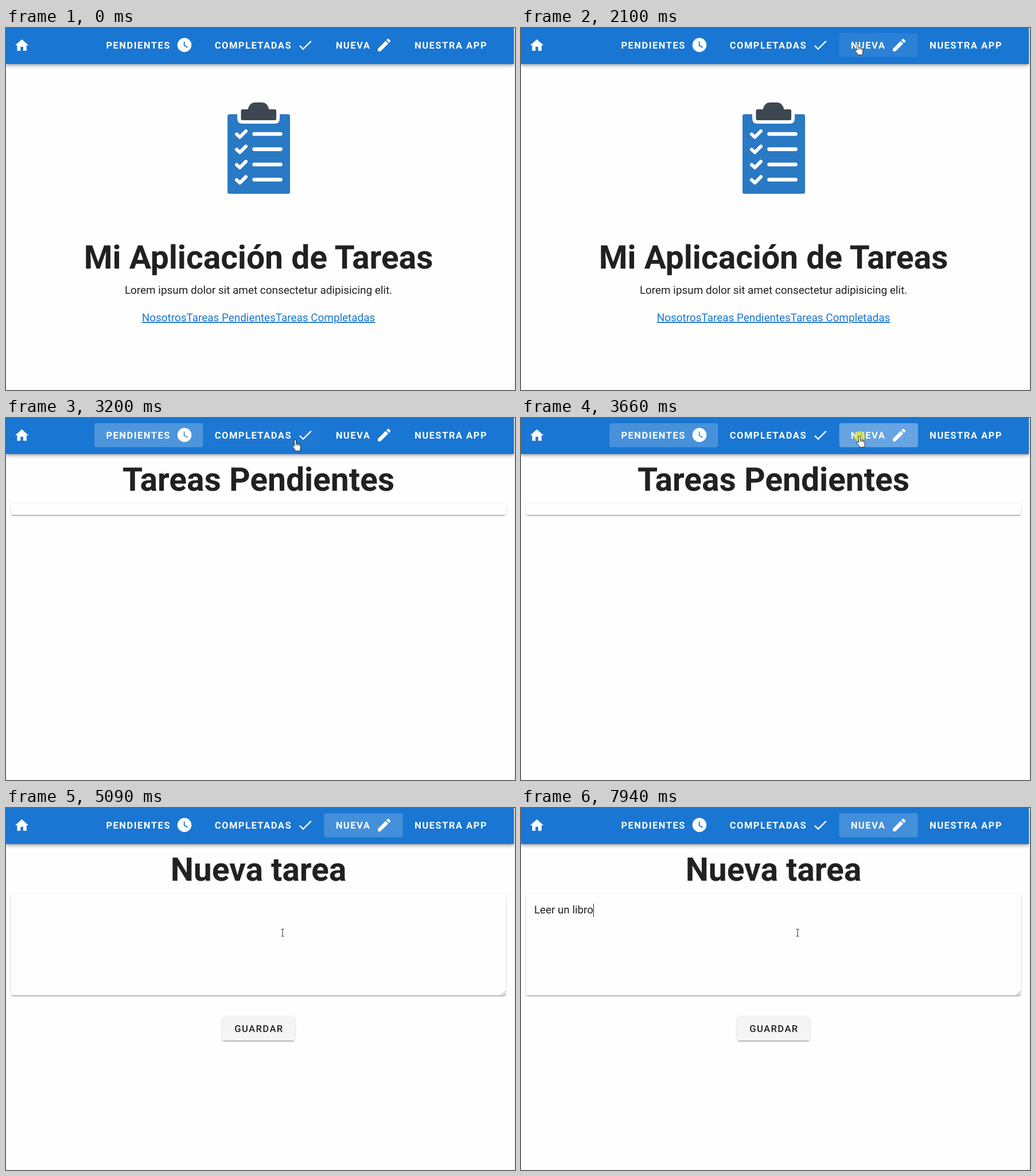
Write an HTML page that moves like this. It is 887x632 px and loops after 8 s.

```html
<!DOCTYPE html>
<html lang="es">
<head>
<meta charset="utf-8">
<title>Mi Aplicación de Tareas</title>
<style>
  html, body { margin: 0; width: 100%; height: 100%; overflow: hidden; background: #fefefe; }
  #stage { position: relative; width: 887px; height: 632px; overflow: hidden; font-family: Roboto, sans-serif; color: #212121; }
  #stage > * { position: absolute; }
  svg { left: 0; top: 0; text-rendering: geometricPrecision; }
  #bar { left: 0; top: 0; width: 885px; height: 63px; background: #1976d2;
    box-shadow: 0 2px 4px -1px rgba(0,0,0,.2), 0 4px 5px rgba(0,0,0,.14), 0 1px 10px rgba(0,0,0,.12); }
  #edge { left: 886px; top: 0; width: 1px; height: 632px; background: #e8e8e8; }
  .raised { border-radius: 4px;
    box-shadow: 0 3px 1px -2px rgba(0,0,0,.2), 0 2px 2px rgba(0,0,0,.14), 0 1px 5px rgba(0,0,0,.12); }
  #card { left: 9px; top: 150px; width: 862px; background: #fefefe; }
  #save { left: 377px; top: 364px; width: 126px; height: 42px; background: #f5f5f5; }
  #typed { left: 23px; top: 167px; height: 23px; line-height: 23px; font-size: 18.77px; white-space: pre;
    border-right: 1px solid transparent; text-rendering: geometricPrecision; }
  text { fill: #212121; }
  .nav { font-weight: 700; font-size: 16.5px; letter-spacing: 1.5px; fill: #fff; }
  .title { font-weight: 700; font-size: 56.9px; text-anchor: middle; }
  .mid { text-anchor: middle; }
  .link { fill: #1976d2; text-decoration: underline; }
  #hint { fill: #707070; }
</style>
</head>
<body>
<div id="stage">
  <div id="edge"></div>
  <div id="bar"></div>
  <div id="card" class="raised"></div>
  <div id="save" class="raised"></div>
  <div id="typed"></div>
  <svg width="887" height="632" viewBox="0 0 887 632">
    <defs>
      <clipPath id="pendingClip"><rect x="154" y="9" width="189" height="42" rx="4"/></clipPath>
      <clipPath id="createClip"><rect x="555" y="9" width="137" height="42" rx="4"/></clipPath>
      <g id="row" fill="none" stroke="#fff" stroke-linecap="round" stroke-linejoin="round">
        <path d="M402 .5 407.5 5.5 418-5" stroke-width="6"/>
        <path d="M432.5 0H478.5" stroke-width="6.6"/>
      </g>
    </defs>

    <g id="tints" fill="#fff"></g>
    <g clip-path="url(#pendingClip)"><circle id="pendingRipple" cx="254" cy="30" fill="#fff"/></g>
    <g clip-path="url(#createClip)"><circle id="createRipple" cx="605" cy="30" fill="#fff"/></g>

    <g fill="#fff">
      <path transform="translate(13.6 16.3) scale(1.17)" d="M10 20V14H14V20H19V12H22L12 3 2 12H5V20Z"/>
      <path transform="translate(296.2 14.9) scale(1.23)" fill-rule="evenodd" d="M12 2A10 10 0 0 0 12 22 10 10 0 0 0 12 2M16.2 16.2 11 13V7H12.5V12.2L17 14.9Z"/>
      <path transform="translate(506.7 15.1) scale(1.23)" d="M21 7 9 19 3.5 13.5 4.91 12.09 9 16.17 19.59 5.59Z"/>
      <path transform="translate(644.3 15) scale(1.23)" d="M20.71 7.04C21.1 6.65 21.1 6 20.71 5.63L18.37 3.29C18 2.9 17.35 2.9 16.96 3.29L15.12 5.12 18.87 8.87M3 17.25V21H6.75L17.81 9.93 14.06 6.18Z"/>
    </g>
    <g id="labels"></g>

    <g id="home">
      <rect x="386" y="150.5" width="109" height="139" rx="3.5" fill="#2a79c4"/>
      <path d="M403 148V158Q403 167 412 167H468Q477 167 477 158V148Z" fill="#fefefe"/>
      <rect x="409.5" y="142" width="61.5" height="19" rx="2.5" fill="#3c4751"/>
      <path d="M421.5 143C423 134 428 130 434 130H446C452 130 457 134 458.5 143Z" fill="#3c4751"/>
      <g id="rows"></g>
      <text class="title" x="440" y="420">Mi Aplicación de Tareas</text>
      <text class="mid" x="440" y="464" font-size="18.9">Lorem ipsum dolor sit amet consectetur adipisicing elit.</text>
      <text class="mid link" x="440" y="512" font-size="18.9">NosotrosTareas PendientesTareas Completadas</text>
    </g>
    <text id="pending" class="title" x="440" y="127">Tareas Pendientes</text>
    <g id="create">
      <text class="title" x="440" y="127">Nueva tarea</text>
      <text id="hint" x="22.7" y="190" font-size="18.85">Descripcion de la tarea</text>
      <text class="mid" x="441" y="391" font-size="16.5" font-weight="500" letter-spacing="1.47">GUARDAR</text>
      <path d="M863.5 327 870.5 320M867.5 327 870.5 324" stroke="#777"/>
    </g>

    <circle id="press" r="9.3" fill="#dce035" fill-opacity=".75"/>
    <g id="cursor">
      <path id="arrow" d="M0 0V13L3 10.2 5 15 7 14.2 5 9.6H9Z" fill="#fff" stroke="#1e5a9e"/>
      <g id="hand" stroke="#222" stroke-width=".9">
        <path d="M-1.5 1Q-1.5-.5 0-.5T1.5 1V6L7 7.5Q9 8 9 10V14Q9 17 7.5 19H.5Q-1 16-4 12.5-5.5 10.5-4 9.8-3 9.5-1.5 11Z" fill="#fff"/>
        <path d="M1.5 6V10M4.2 7V10M6.7 7.5V10.5" fill="none"/>
      </g>
      <path id="beam" d="M-2.5-6H-.5L0-5.5.5-6H2.5M0-5.5V6M-2.5 6.5H-.5L0 6 .5 6.5H2.5" fill="none" stroke="#222"/>
    </g>
  </svg>
</div>
<script>
const LOOP = 8000;
const PHRASE = 'Leer un libro';
const TYPE_AT = 5630, KEY_GAP = 192.5, BLINK_AT = 5090;
const PENDING_CLICK = 2650, CREATE_CLICK = 3540, FIELD_CLICK = 4480;
const PENDING_AT = PENDING_CLICK + 135, CREATE_AT = CREATE_CLICK + 135, FOCUS_AT = FIELD_CLICK + 70;

const $ = id => document.getElementById(id);
const show = (id, on) => { $(id).style.display = on ? '' : 'none'; };
const ramp = (t, from, length) => Math.min(1, Math.max(0, (t - from) / length));
const smooth = k => k * k * (3 - 2 * k);

function add(parent, tag, attributes, text = '') {
  const node = document.createElementNS('http://www.w3.org/2000/svg', tag);
  for (const key in attributes) node.setAttribute(key, attributes[key]);
  node.textContent = text;
  return $(parent).appendChild(node);
}

const items = [
  { label: 'PENDIENTES', left: 154, right: 343.3 },
  { label: 'COMPLETADAS', left: 343.3, right: 554.3 },
  { label: 'NUEVA', left: 554.3, right: 691.6 },
  { label: 'NUESTRA APP', left: 691.6, right: 858 }
];
for (const item of items) {
  item.tint = add('tints', 'rect', { x: item.left, y: 9, width: item.right - item.left, height: 42, rx: 4 });
  add('labels', 'text', { class: 'nav', x: item.left + 20.4, y: 36 }, item.label);
}
for (let i = 0; i < 4; i++) add('rows', 'use', { href: '#row', y: 185 + i * 26.6 });

// Eased pointer moves; bow bends the path sideways
const START = { x: 788, y: 592 };
const moves = [
  { from: 500, to: 1230, x: 200, y: 21 },
  { from: 1310, to: 1780, x: 645, y: 20 },
  { from: 1780, to: 1900, x: 590, y: 28 },
  { from: 2070, to: 2600, x: 261.5, y: 30 },
  { from: 3060, to: 3272, x: 590, y: 32, bow: -9 },
  { from: 3890, to: 4460, x: 482, y: 217.5, bow: 31 }
];

function pointer(t) {
  let { x, y } = START;
  for (const move of moves) {
    if (t < move.from) break;
    const k = smooth(ramp(t, move.from, move.to - move.from));
    const dx = move.x - x, dy = move.y - y;
    const side = 4 * k * (1 - k) * (move.bow || 0) / Math.hypot(dx, dy);
    x += dx * k + dy * side;
    y += dy * k - dx * side;
  }
  return { x, y };
}

const inside = ({ x, y }, { left, right }) => x >= left && x < right && y >= 9 && y < 51;

// Fade by the share of the last 200 ms spent over the item
function hover(t, item) {
  let hits = 0;
  for (let i = 0; i < 10; i++) if (inside(pointer(t - i * 20), item)) hits++;
  return (hits / 10) ** 2;
}

function drawRipple(id, age) {
  $(id).setAttribute('r', 30 + 80 * ramp(age, 0, 143));
  $(id).setAttribute('opacity', age < 0 ? 0 : 0.19 * (1 - ramp(age, 110, 200)));
}

function draw(t) {
  const creating = t >= CREATE_AT;
  show('home', t < PENDING_AT);
  show('pending', t >= PENDING_AT && !creating);
  show('create', creating);
  show('save', creating);
  show('card', t >= PENDING_AT);
  show('hint', t < FOCUS_AT);
  $('card').style.height = (creating ? 177 : 19) + 'px';

  const active = {
    PENDIENTES: 0.2 * (ramp(t, PENDING_CLICK, 200) - ramp(t, CREATE_AT, 150)),
    NUEVA: 0.18 * ramp(t, CREATE_CLICK, 200)
  };
  for (const item of items) {
    item.tint.setAttribute('opacity', (active[item.label] || 0) + 0.08 * hover(t, item));
  }
  drawRipple('pendingRipple', t - PENDING_CLICK);
  drawRipple('createRipple', t - CREATE_CLICK);

  const point = pointer(t);
  const overItem = items.some(item => inside(point, item));
  const overField = creating && point.y > 151 && point.y < 327;
  $('cursor').setAttribute('transform', `translate(${point.x} ${point.y})`);
  show('cursor', t >= moves[0].from);
  show('hand', overItem);
  show('beam', overField);
  show('arrow', !overItem && !overField);

  $('press').setAttribute('cx', point.x);
  $('press').setAttribute('cy', point.y);
  show('press', [PENDING_CLICK, CREATE_CLICK, FIELD_CLICK].some(click => t >= click && t < click + 200));

  const length = Math.max(0, Math.floor((t - TYPE_AT) / KEY_GAP) + 1);
  const caret = t >= FOCUS_AT && (t < BLINK_AT || length > 0);
  $('typed').textContent = PHRASE.slice(0, length);
  $('typed').style.borderColor = caret ? '#222' : 'transparent';
}

const begin = performance.now();
function tick() {
  draw((performance.now() - begin) % LOOP);
  requestAnimationFrame(tick);
}
tick();
</script>
</body>
</html>
```
